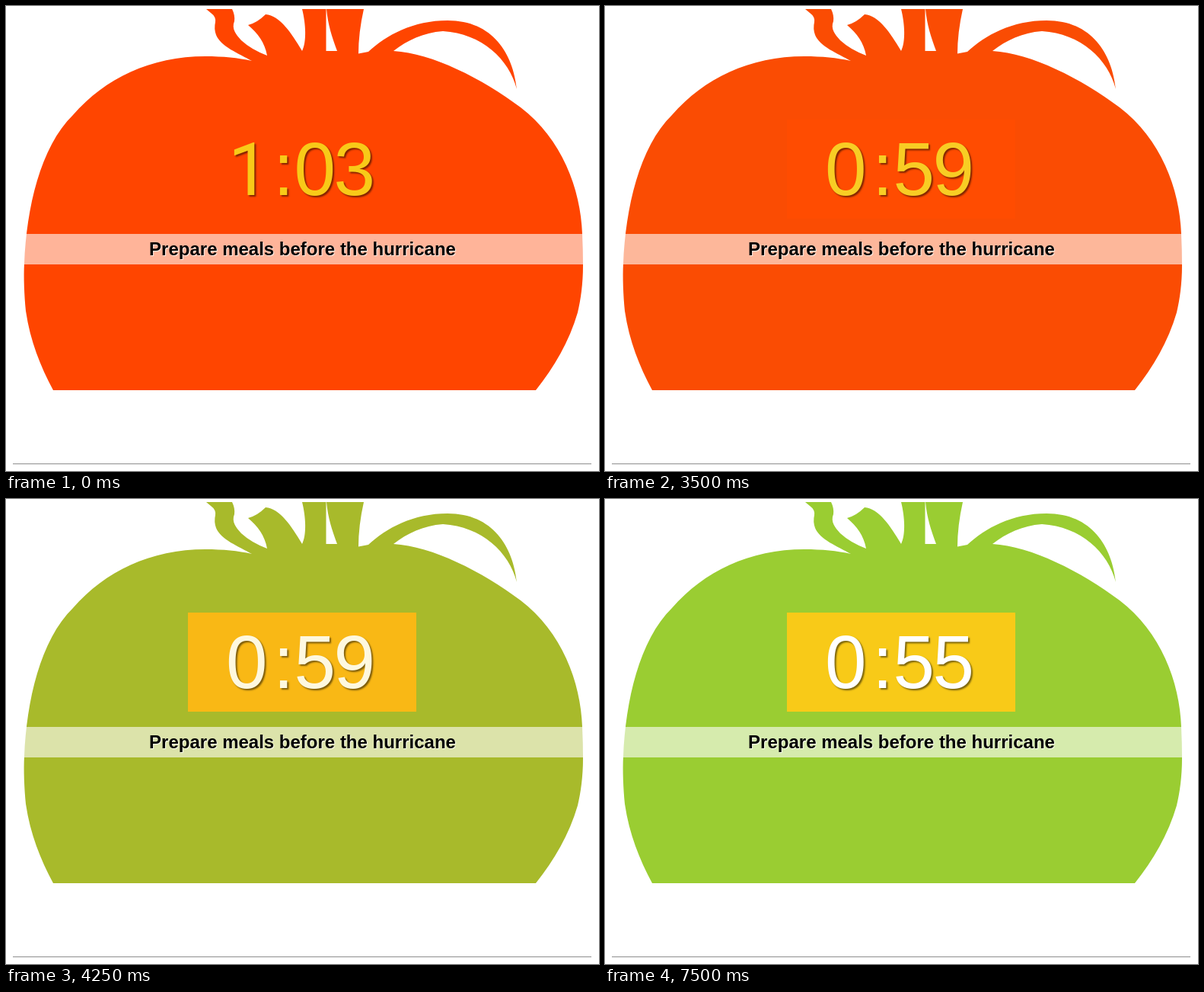
Animation of 779x610 px, one loop 8250 ms. Source, as an HTML page with a canvas:

```html
<!DOCTYPE html>
<html lang="en">
<head>
<meta charset="utf-8">
<title>Tomato timer</title>
<style>
  html, body { margin: 0; width: 100%; height: 100%; overflow: hidden; background: #fff; }
  canvas { display: block; }
</style>
</head>
<body>
<canvas width="779" height="610"></canvas>
<script>
const ctx = document.querySelector('canvas').getContext('2d');
const LOOP = 8250, STEP = 250, FADE_START = 3400, FADE_TIME = 1500;
const ORANGE_RED = [255, 69, 0], GREEN = [154, 205, 50];
const YELLOW = [248, 202, 24], WHITE = [255, 255, 255];
const SLOTS = [289, 351, 378.5, 430.5];

const tomato = new Path2D(`
  M62 504 C45 472 32 440 26 400 C24 380 23 355 24 338
  C27 265 45 185 88 143 C130 95 190 66 262 66 C285 66 305 68 323 72
  C305 62 282 53 276 38 Q273 30 275 21 Q276 14 269 9 L263 4 H297
  Q301 12 300 20 C296 30 302 37 309 45 Q322 57 343 65
  C340 48 331 36 318 25 Q330 22 341 11 C360 13 374 34 389 59
  C395 47 394 24 389 4 H420.5 V59 H435 C428 40 423 25 421 4 H470
  Q463 35 463 62.5 L476 60 C500 38 535 19 580 19 C640 19 666 63 671 109
  C661 70 625 36 574 33 C548 35 527 45 509 59
  C560 62 625 95 676 133 C730 174 755 240 757 299 Q758 320 758 340
  C758 365 755 385 751 402 C740 440 720 474 696 504 Z`);

const mix = (from, to, k) => `rgb(${from.map((v, i) => Math.round(v + (to[i] - v) * k))})`;
const bezier = (a, b, s) => 3 * a * s * (1 - s) ** 2 + 3 * b * s * s * (1 - s) + s ** 3;

// The CSS "ease" curve, solved by bisection.
function ease(x) {
  if (x <= 0 || x >= 1) return x <= 0 ? 0 : 1;
  let low = 0, high = 1;
  for (let i = 0; i < 24; i++) {
    const mid = (low + high) / 2;
    if (bezier(0.25, 0.25, mid) < x) low = mid; else high = mid;
  }
  return bezier(0.1, 1, low);
}

function fillRect(color, x, y, w, h) {
  ctx.fillStyle = color;
  ctx.fillRect(x, y, w, h);
}

function setShadow(color, offset, blur) {
  ctx.shadowColor = color;
  ctx.shadowOffsetX = ctx.shadowOffsetY = offset;
  ctx.shadowBlur = blur;
}

function drawClock(seconds, color) {
  const text = Math.floor(seconds / 60) + ':' + String(seconds % 60).padStart(2, '0');
  ctx.fillStyle = color;
  ctx.textAlign = 'left';
  setShadow('rgba(0,0,0,.5)', 2, 2);
  [...text].forEach((char, i) => {
    const isOne = char === '1'; // Roboto's 1 has no foot
    ctx.font = isOne ? '97px Roboto, sans-serif' : '98px "Liberation Sans", Arial, sans-serif';
    ctx.fillText(char, SLOTS[i] + (isOne ? 2.7 : 0), 247.5);
  });
}

function drawTitle() {
  ctx.fillStyle = '#000';
  ctx.font = 'bold 24px "Liberation Sans", Arial, sans-serif';
  ctx.textAlign = 'center';
  setShadow('rgba(255,255,255,.8)', 1, 1);
  ctx.fillText('Prepare meals before the hurricane', 389.5, 327);
}

function draw(now) {
  const time = Math.floor((now % LOOP) / STEP) * STEP;
  const fade = ease((time - FADE_START) / FADE_TIME);
  fillRect('#fff', 0, 0, 779, 610);
  ctx.fillStyle = mix(ORANGE_RED, GREEN, fade);
  ctx.fill(tomato);
  fillRect(mix(ORANGE_RED, YELLOW, fade), 239, 149, 300, 130);
  fillRect('rgba(255,255,255,.6)', 0, 299, 779, 40);
  fillRect('#9a9a9a', 9, 600, 760, 1);
  fillRect('#eee', 9, 601, 760, 1);
  drawClock(63 - Math.floor((time + 500) / 1000), mix(YELLOW, WHITE, fade));
  drawTitle();
  setShadow('transparent', 0, 0);
}

const start = performance.now();
function tick() {
  draw(performance.now() - start);
  requestAnimationFrame(tick);
}
tick();
</script>
</body>
</html>
```
